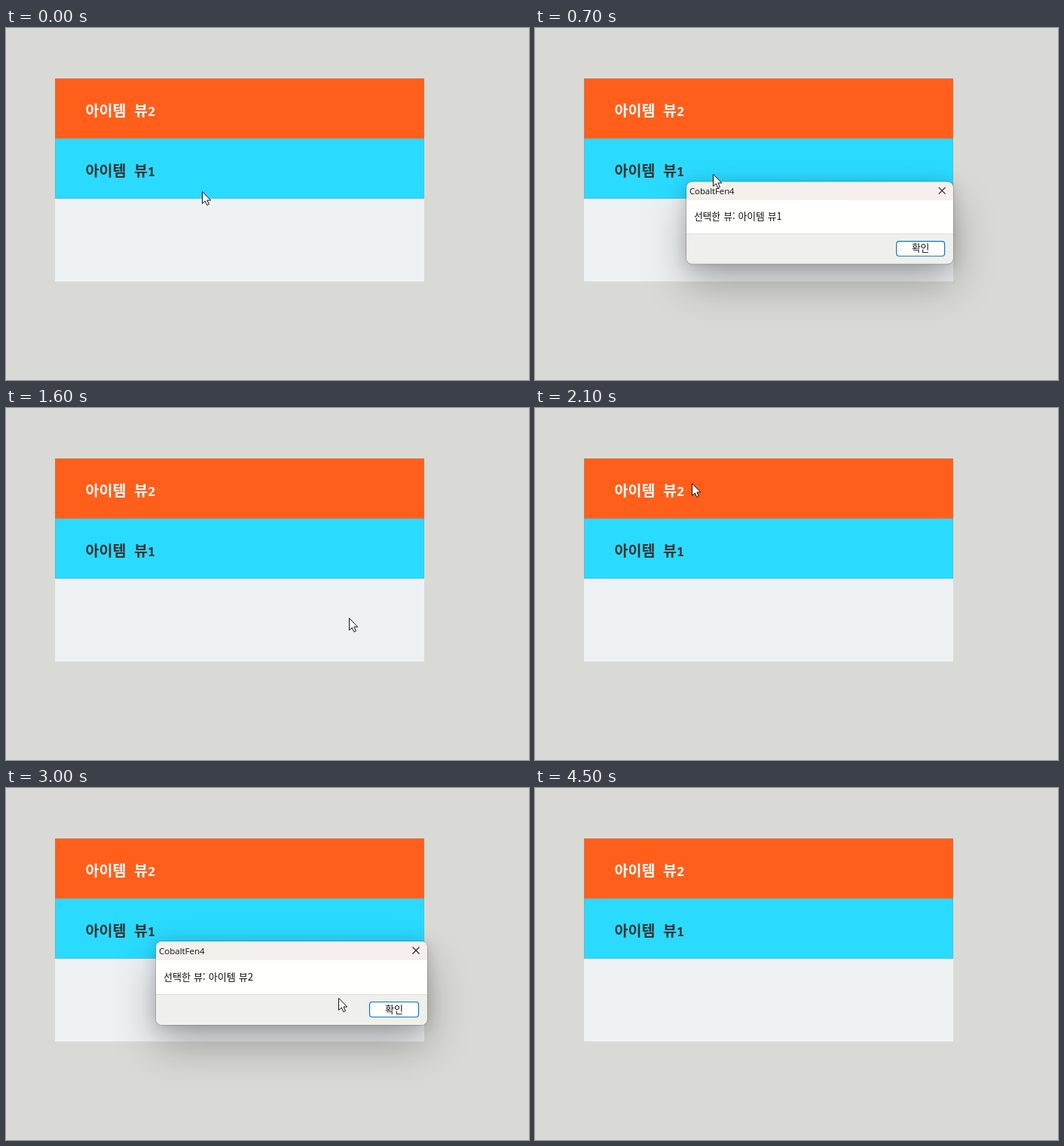
Animation of 694x468 px, one loop 4.6 s. Source, as an HTML page:

```html
<!DOCTYPE html>
<html lang="ko">
<head>
<meta charset="utf-8">
<title>아이템 뷰</title>
<style>
  html, body { margin: 0; width: 100%; height: 100%; overflow: hidden; background: #d9dad5; }
  svg { display: block; }
  #stage { position: relative; width: 694px; height: 468px; overflow: hidden; }
  #dialog {
    position: absolute; left: 199px; top: 204px; width: 360px; height: 111px;
    border-radius: 8px; transform-origin: 120px 27px;
    box-shadow: 0 0 0 1px rgba(60, 60, 60, .25), 0 2px 20px rgba(0, 0, 0, .17), 0 28px 56px rgba(0, 0, 0, .28);
  }
  #dialog svg { border-radius: 8px; }
  #cursor { position: absolute; left: 0; top: 0; }
  text { font-family: "Noto Sans CJK KR", "Noto Sans CJK", "Noto Sans CJK JP", sans-serif; }
  .item { font-size: 19.5px; font-weight: 700; }
  .edge { fill: none; stroke: rgba(150, 150, 150, .4); }
  .num { font-family: "Noto Sans Mono", monospace; font-size: 16.7px; font-weight: 600; }
  .ui { font-size: 13px; fill: #111; }
  .title { font-family: "Open Sans", sans-serif; font-size: 11.5px; }
</style>
</head>
<body>
<div id="stage">
  <svg width="694" height="468">
    <rect width="694" height="468" fill="#d9dad5"/>
    <rect x="65" y="67" width="490" height="270" fill="#eef1f4"/>
    <g id="items"></g>
  </svg>
  <div id="dialog">
    <svg width="360" height="111">
      <defs>
        <linearGradient id="bar"><stop stop-color="#f2f0eb"/><stop offset="1" stop-color="#f7eeee"/></linearGradient>
      </defs>
      <rect width="360" height="111" fill="#efefec"/>
      <rect width="360" height="25" fill="url(#bar)"/>
      <rect y="25" width="360" height="45" fill="#fffffd"/>
      <rect y="70" width="360" height="1" fill="#dededb"/>
      <text class="ui title" x="4" y="17">CobaltFen4</text>
      <path d="M340.5 7.5l9 9m0-9l-9 9" stroke="#222" stroke-width="1.2"/>
      <text class="ui" id="message" x="10" y="51.5" word-spacing=".5"></text>
      <rect id="button" x="283.5" y="80.5" width="65" height="20" rx="3.5" stroke="#0f74b8" stroke-width="1.2"/>
      <text class="ui" x="316" y="94.5" text-anchor="middle">확인</text>
    </svg>
  </div>
  <svg id="cursor" width="16" height="22">
    <path d="M.5 .5V16.5L4.2 13L6.8 18.6L9.4 17.4L6.9 12H11.7Z" fill="#fff" stroke="#111" stroke-linejoin="round"/>
  </svg>
</div>
<script>
const LOOP = 4600, STEP = 100, EXIT = 4200;
const el = id => document.getElementById(id);
const dialog = el("dialog"), cursor = el("cursor"), button = el("button"), message = el("message");

const item = (n, y, fill, ink) => `
  <g class="item" transform="translate(65 ${y})" fill="${ink}">
    <rect width="490" height="80" fill="${fill}"/>
    <rect class="edge" x=".5" y=".5" width="489" height="79"/>
    <text x="40.5" y="50">아이템</text><text x="105" y="50">뷰</text><text class="num" x="123" y="50">${n}</text>
  </g>`;
el("items").innerHTML = item(2, 67, "#ff5f1b", "#fff") + item(1, 147, "#2bdaff", "#333");

// the pointer glides to each place in turn
const home = { x: 260, y: 217 };
const moves = [
  { from: 0, to: 600, x: 236, y: 194 },
  { from: 800, to: 1200, x: 500, y: 296 },
  { from: 1400, to: 1600, x: 455, y: 279 },
  { from: 1600, to: 2100, x: 208, y: 100 },
  { from: 2600, to: 3000, x: 441, y: 279 },
  { from: 3000, to: 3300, x: 497, y: 302 },
  { from: 3700, to: 4100, x: 520, y: 4 }
];
const openings = [
  { from: 600, to: 1400, item: 1 },
  { from: 2500, to: 3600, item: 2 }
];

const clamp = v => Math.min(1, Math.max(0, v));
const easeOut = u => 1 - (1 - u) ** 2;

function pointerAt(t) {
  let { x, y } = home;
  for (const m of moves) {
    const k = easeOut(clamp((t - m.from) / (m.to - m.from)));
    x += (m.x - x) * k;
    y += (m.y - y) * k;
  }
  return { x: Math.round(x), y: Math.round(y) };
}

// the window grows and fades in, and shrinks a little as it fades out
function windowState(t, { from, to }) {
  if (t === to) return { scale: .95, alpha: .32 };
  const n = (t - from) / STEP;
  return { scale: 1 - .086 * .2 ** n, alpha: clamp(.53 + .47 * n) };
}

function draw(t) {
  const tip = pointerAt(t);
  cursor.style.display = t < EXIT ? "block" : "none";
  cursor.style.transform = `translate(${tip.x}px, ${tip.y}px)`;

  const open = openings.find(o => t >= o.from && t <= o.to);
  dialog.style.display = open ? "block" : "none";
  if (!open) return;
  const { scale, alpha } = windowState(t, open);
  dialog.style.transform = scale > .995 ? "none" : `scale(${scale})`;
  dialog.style.opacity = alpha;
  message.textContent = "선택한 뷰: 아이템 뷰" + open.item;
  const over = tip.x > 481 && tip.x < 549 && tip.y > 283 && tip.y < 306;
  button.setAttribute("fill", over ? "#d6e9f7" : "#fff");
}

const start = performance.now();
function tick() {
  const t = (performance.now() - start) % LOOP;
  draw(Math.floor(t / STEP) * STEP);
  requestAnimationFrame(tick);
}
tick();
</script>
</body>
</html>
```
